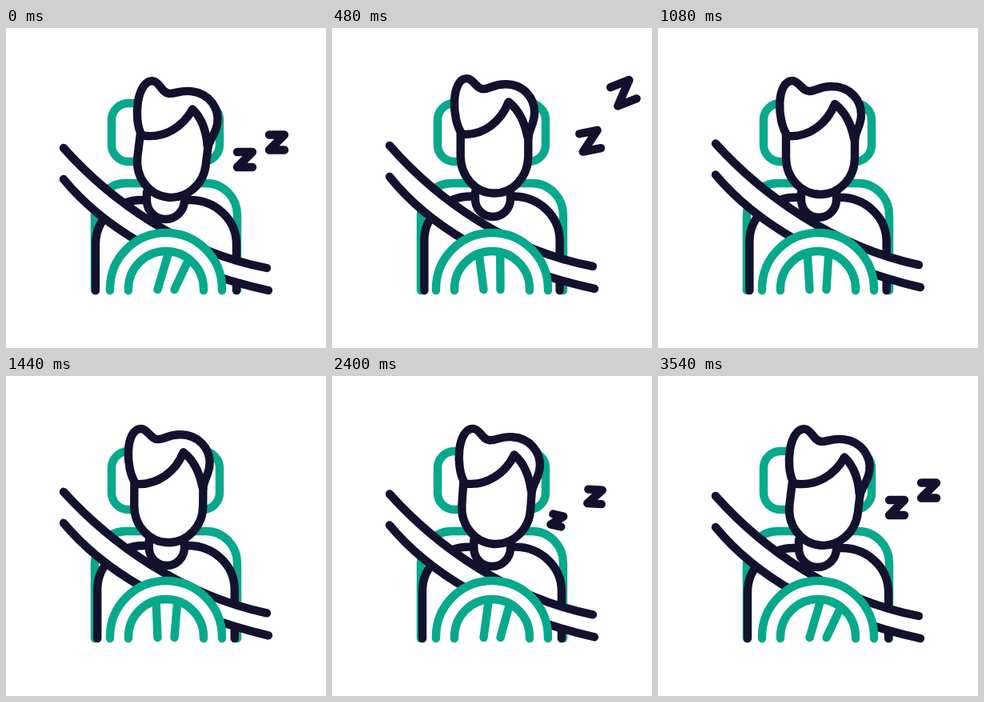
An HTML page with a canvas for the animation above (5.57 s loop, 400 px wide and 400 px high).

```html
<!DOCTYPE html>
<html lang="en">
<head>
<meta charset="utf-8">
<title>Sleepy driver</title>
<style>
  html, body { margin: 0; width: 100%; height: 100%; overflow: hidden; background: #fff; }
  canvas { display: block; width: 100vw; height: 100vh; }
</style>
</head>
<body>
<canvas id="stage" width="400" height="400"></canvas>
<script>
const ctx = document.getElementById('stage').getContext('2d');
const LOOP = 5570, STEP = 30, LAST = 3540;
const WAKE = 270, DIP = 720, SETTLE = 1080;
const DARK = '#12122f', GREEN = '#06a98b', WHITE = '#fff';

const FACE = new Path2D('M160 134V162A43 46 0 0 0 246 162V134');
const HAIR = new Path2D('M162 135C148 116 148 66 168 66C176 66 180 79 189 79' +
  'S201 73 217 73C240 73 254 90 254 108C254 122 247 128 246 140');
const FRINGE = new Path2D('M162 135C190 137 212 118 221 95C233 104 241 118 245 138');
const CHIN = { x: 203, y: 208 };

const SNORES = [
  { rest: { x: 298.5, y: 164.5 }, exit: { x: 353, y: 92 }, gone: 720, born: 2120 },
  { rest: { x: 338.5, y: 143 },   exit: { x: 375, y: 43 }, gone: 570, born: 1740 }
];
const BIRTH = { x: 264, y: 193 }, GROW = 1350;

const mix = (a, b, p) => a + (b - a) * p;
const clamp = p => Math.max(0, Math.min(1, p));
const ease = (t, from, to) => {
  const p = clamp((t - from) / (to - from));
  return p * p * (3 - 2 * p);
};

// awake: 0 drooping, 1 upright; jolt: the startled bounce, up then down
function poseAt(t) {
  const awake = Math.min(ease(t, 0, WAKE), 1 - ease(t, SETTLE, LAST));
  const jolt = ease(t, 0, WAKE) - 1.5 * ease(t, WAKE, DIP) + .5 * ease(t, DIP, SETTLE);
  return { awake, jolt, lift: .4 * awake + .5 * jolt };
}

function paint(path, color, filled) {
  if (filled) {
    ctx.fillStyle = WHITE;
    ctx.fill(path);
  }
  ctx.strokeStyle = color;
  ctx.stroke(path);
}

// Open-bottomed arch with elliptical shoulders
function arch(left, right, top, rx, ry, bottom = 328) {
  return new Path2D(`M${left} ${bottom}V${top + ry}A${rx} ${ry} 0 0 1 ${left + rx} ${top}` +
    `H${right - rx}A${rx} ${ry} 0 0 1 ${right} ${top + ry}V${bottom}`);
}

function drawSeat() {
  const rest = new Path2D();
  rest.roundRect(132, 94, 135, 73, 21);
  paint(rest, GREEN, true);
  paint(arch(111, 289, 194, 39, 40), GREEN, true);
}

function drawBody({ lift, awake }) {
  const side = 112 + 6 * lift;
  paint(arch(side, 400 - side, 215 - 8 * lift, 58, 55), DARK, true);

  const left = 176 + 3 * awake, right = 223, r = (right - left) / 2;
  const y = 239 - r - 5.5 * lift;
  paint(new Path2D(`M${left} 205V${y}A${r} ${r} 0 0 0 ${right} ${y}V205`), DARK, true);
}

function drawBelt({ awake, jolt }) {
  const rise = 7.5 * jolt - 5.5 * awake;
  const sag = 1.2 * rise + 6 * jolt;
  const a = rise, b = sag, c = .7 * rise;
  const upper = `M72 ${150 + a}C130 ${215 + b} 220 ${280 + b} 326 ${300 + c}`;
  const lower = `328 ${328 + c}C200 ${300 + b} 118 ${245 + b} 72 ${189 + a}`;
  ctx.fillStyle = WHITE;
  ctx.fill(new Path2D(upper + 'L' + lower));
  paint(new Path2D(upper + 'M' + lower), DARK);
}

function drawHead({ awake, jolt }) {
  const droop = 1 - awake;
  const pose = new DOMMatrix()
    .translate(CHIN.x - 1.5 * droop, CHIN.y + 3.5 * droop - 4.5 * jolt)
    .rotate(7 * droop)
    .scale(1 - .05 * jolt, 1 + .03 * jolt)
    .translate(-CHIN.x, -CHIN.y);
  for (const part of [FACE, HAIR, FRINGE]) {
    const path = new Path2D();
    path.addPath(part, pose);
    paint(path, DARK, part !== FRINGE);
  }
}

function drawWheel({ awake, jolt }) {
  const turn = 21 * (1 - awake) - 12 * jolt;
  for (const r of [70, 47]) paint(arch(200 - r, 200 + r, 326 - r, r, r), GREEN, true);
  for (const side of [-1, 1]) {
    const a = (turn + side * 16.5) * Math.PI / 180;
    const spoke = new Path2D();
    spoke.moveTo(200 + 47 * Math.sin(a), 326 - 47 * Math.cos(a));
    spoke.lineTo(200 + side * 10.5, 327);
    paint(spoke, GREEN);
  }
}

function drawZ(x, y, size, turn) {
  const d = 9.5 * size;
  ctx.save();
  ctx.translate(x, y);
  ctx.rotate(turn * Math.PI / 180);
  paint(new Path2D(`M${-d} ${-d}H${d}L${-d} ${d}H${d}`), DARK);
  ctx.restore();
}

function drawSnore({ rest, exit, gone, born }, t) {
  if (t <= gone) {
    const p = t / gone, e = p ** 2, f = p ** 2.8;
    drawZ(mix(rest.x, exit.x, e), mix(rest.y, exit.y, f), 1 + .45 * e, -35 * f);
  } else if (t >= born) {
    const e = 1 - (1 - clamp((t - born) / GROW)) ** 3;
    drawZ(mix(BIRTH.x, rest.x, e), mix(BIRTH.y, rest.y, e ** 1.2), .4 + .6 * e, 26 * (1 - e));
  }
}

function draw(now) {
  const t = Math.min(LAST, Math.floor(now % LOOP / STEP) * STEP);
  const pose = poseAt(t);
  ctx.fillStyle = WHITE;
  ctx.fillRect(0, 0, 400, 400);
  ctx.lineWidth = 10.4;
  ctx.lineCap = ctx.lineJoin = 'round';
  SNORES.forEach(z => drawSnore(z, t));
  drawSeat();
  drawBody(pose);
  drawBelt(pose);
  drawHead(pose);
  drawWheel(pose);
}

const start = performance.now();
function tick() {
  draw(performance.now() - start);
  requestAnimationFrame(tick);
}
tick();
</script>
</body>
</html>
```
